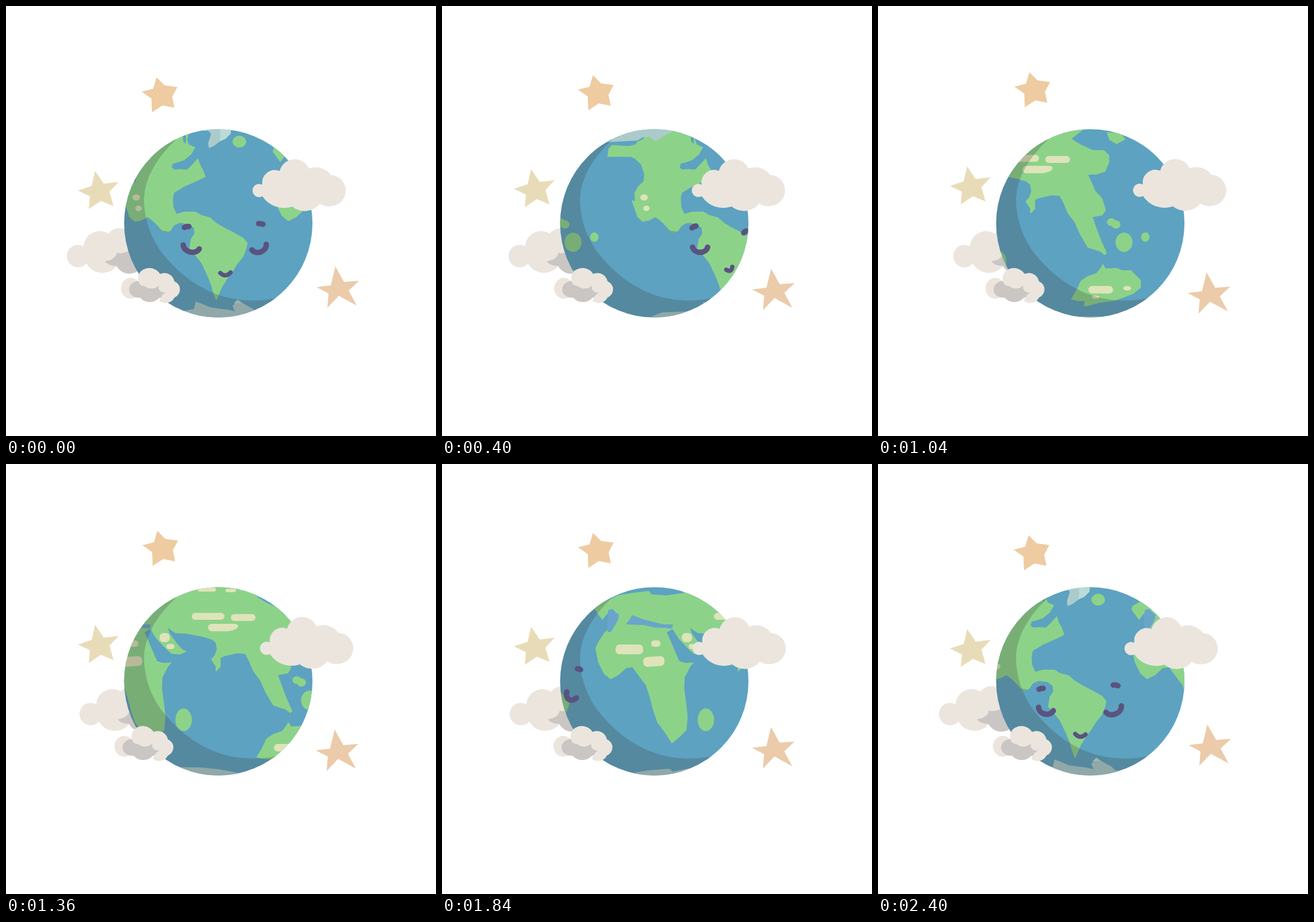
These frames come from a looping animation (748x748 px, 2480 ms). An HTML page:

```html
<!DOCTYPE html>
<html lang="en">
<head>
<meta charset="utf-8">
<title>Sleeping Earth</title>
<style>
  html, body { margin: 0; width: 100%; height: 100%; overflow: hidden; background: #fff; }
  svg { display: block; width: 100%; height: 100%; }
  .ocean { fill: #5da2c0; }
  .sea { fill: #69a5ca; }
  .land { fill: #8cd389; stroke: #8cd389; stroke-width: .6; stroke-linejoin: round; }
  .sand { fill: #dfe3b9; }
  .ice { fill: #abcbcb; }
  .snow { fill: #b9dcd8; }
  .cloud { fill: #ebe5de; }
  .dim { fill: #cac6c3; }
  #face { fill: none; stroke: #5a5380; stroke-linecap: round; }
  #face path { vector-effect: non-scaling-stroke; }
</style>
</head>
<body>
<svg viewBox="0 0 748 748">
  <defs>
    <clipPath id="disc"><circle cx="369.3" cy="378" r="163.8"/></clipPath>
    <g id="world">
      <path class="ice" d="M122 205V212L137 224 150 232 161 237 215 234 225 228 246 236 280 217V205Z"/>
      <path class="ice" d="M230 545L245 538 258 533 306 531 327 527 330 514 341 518 355 524 368 526 385 528 398 531 394 522 403 511 417 520 430 527 436 533 470 536 531 537 556 533 593 530 600 535 640 527 688 528 718 531 756 538 800 540 860 540 920 539V545Z"/>
      <g class="land">
        <!-- North America -->
        <path d="M163 262L165 248 171 242 200 244 212 241 215 236 223 233 227 229 237 228 246 236 257 229 275 219 285 208H312L317 223 315 233 318 241 329 246 322 258 310 268 298 272 290 274 288 281 293 285 303 284 315 285 325 275 334 265 337 275 343 286 347 297 335 303 310 314 292 325 290 335 291 350 297 363 293 380 286 391 278 394 270 389 260 378 252 371 246 367 235 373 224 375 215 367 210 352 205 338 211 340 210 325 217 313 226 305 227 292 221 275 210 265 203 262Z"/>
        <!-- South America -->
        <path d="M290 364L310 358 330 358 340 364 355 368 365 377 380 386 392 392 412 403 420 412 418 422 412 437 402 449 394 462 385 474 375 490 366 512 361 500 357 485 350 468 340 447 328 432 319 422 322 405 328 396 327 386 318 379 302 377 285 385Z"/>
        <ellipse cx="406" cy="236" rx="11.500" ry="10"/>
      </g>
      <path fill="#75ad7a" d="M268 390L282 392 277 395Z"/>
      <path class="ocean" d="M308 225V235L313 240V225Z"/>
      <path class="snow" d="M340 205V217L352 217 357 222 352 238 353 247 362 243 371 236 382 231 391 222 392 205Z"/>
      <path class="ice" d="M340 205V217L352 217 357 222 352 238 353 247 362 243 371 236 373 226 371 205Z"/>
      <path class="snow" d="M396 517L403 511 411 517Z"/>
      <g class="sand">
        <ellipse cx="226.5" cy="333" rx="6.5" ry="5.5"/>
        <ellipse cx="230.5" cy="352" rx="5.5" ry="4.8"/>
      </g>
      <g transform="translate(-575)">
        <g class="land">
          <!-- Africa -->
          <path d="M289 288L310 280 320 279 350 281 370 285 400 287 391 293 398 308 406 325 413 343 424 346 438 345 432 352 422 371 421 390 425 420 427 440 425 463 415 473 400 486 390 470 375 450 368 430 362 407 355 385 340 365 331 353 320 355 307 367 293 374 282 365 272 345 267 320 273 308 283 293Z"/>
          <!-- Europe and Arabia -->
          <path d="M266 253L268 247 284 238 300 232 305 229 335 224 360 221 364 227 390 229 424 224 440 205 455 290 436 288 431 283 434 294 447 312 457 323 464 326 453 331 438 330 427 320 411 303 402 288 370 284 320 280 289 290V258L279 271Z"/>
          <!-- Asia -->
          <path d="M420 225L440 205H610L608 214 586 231 602 241 624 251 643 251 652 260 652 272 645 288 630 293 615 293 622 308 628 322 640 335 646 355 640 364 623 367 630 387 638 408 648 430 644 433 637 427 615 420 602 398 592 376 580 360 573 343 566 330 552 329 530 334 523 337 523 353 515 361 515 352 507 340 513 333 517 322 515 311 508 305 491 300 465 295 445 294 436 288 420 270Z"/>
          <!-- Australia -->
          <path d="M641 449L646 457 665 456 675 460 690 460 700 470 707 477 707 490 695 500 680 506 660 513 635 516 613 522 608 522 610 513 598 513 586 510 595 495 603 478 615 470 630 465 638 455Z"/>
          <path d="M648 220L672 221 680 232 665 240 653 233Z"/>
          <ellipse cx="459" cy="445" rx="14" ry="19.5"/>
          <ellipse cx="656" cy="376" rx="7.5" ry="6.5"/>
          <ellipse cx="664" cy="380" rx="7.5" ry="7"/>
          <ellipse cx="678" cy="411" rx="14.5" ry="16.5"/>
          <ellipse cx="715" cy="402" rx="7" ry="8"/>
        </g>
        <g class="sea">
          <path d="M289 254L297 252 302 258 308 262 306 272 300 282 294 292 288 293Z"/>
          <path d="M320 279L326 271 331 263 350 270 385 279 402 279 400 286 370 284 350 280Z"/>
        </g>
        <path class="ocean" d="M391 292L402 290 411 303 420 317 429 329 439 332 438 345 424 346 413 343 405 325Z"/>
        <g class="sand">
          <rect x="302" y="314" width="48" height="17" rx="7"/>
          <rect x="364" y="307" width="16" height="11" rx="5"/>
          <rect x="350" y="335" width="37" height="17" rx="7" transform="rotate(-4 368 343)"/>
          <rect x="417" y="294" width="18" height="16" rx="7"/>
          <rect x="429" y="313" width="14" height="9" rx="4.5"/>
          <rect x="473" y="259" width="57" height="12" rx="6"/>
          <rect x="541" y="261" width="43" height="12" rx="6"/>
          <path d="M508 278H548Q556 279 553 284Q548 291 530 291H508A6.5 6.5 0 0 1 508 278Z"/>
          <rect x="484" y="215" width="31" height="7" rx="3.5"/>
          <rect x="532" y="217" width="18" height="6" rx="3"/>
          <rect x="616" y="487" width="43" height="13" rx="6.5"/>
          <ellipse cx="683.5" cy="491" rx="7" ry="4"/>
          <ellipse cx="628.5" cy="506.5" rx="6.5" ry="2.7"/>
        </g>
      </g>
    </g>
  </defs>

  <path id="starTop" fill="#eecba0" d="M262 124L276 138 298 141 289 158 293 177 272 173 254 185 253 161 236 149 256 144Z"/>
  <path id="starLeft" fill="#e8dcb8" d="M155 287L170 309 196 306 180 323 187 348 165 339 144 353 146 331 125 321 149 313Z"/>
  <path id="starRight" fill="#ebcbaa" d="M573 453L588 480 614 478 596 495 610 521 579 504 559 525 561 500 540 489 565 486Z"/>

  <g id="cloudBack">
    <path class="cloud" d="M140 448A19.5 19.5 0 1 1 135 418A28 28 0 0 1 178 396A25 25 0 0 1 220 400V450L193 452A32 32 0 0 1 140 448Z"/>
    <path class="dim" d="M172 444Q190 442 193 429Q205 433 225 420L250 440 228 462A26 26 0 0 1 192 452A24 24 0 0 1 172 444Z"/>
  </g>

  <g clip-path="url(#disc)">
    <rect class="ocean" x="200" y="208" width="340" height="340"/>
    <g id="map">
      <use href="#world" x="-773"/>
      <use href="#world"/>
      <use href="#world" x="773"/>
    </g>
    <path fill="#3c3939" fill-opacity=".245" d="M298 230Q242 283 240 335C240 375 255 410 276 435C300 464 365 530 470 508V560H200V230Z"/>
    <g id="face"></g>
  </g>

  <g id="cloudSmall">
    <ellipse class="cloud" cx="217" cy="491" rx="17" ry="18"/>
    <g class="dim">
      <ellipse cx="231" cy="493" rx="17" ry="14.5"/>
      <ellipse cx="250" cy="498" rx="20" ry="17"/>
      <ellipse cx="264" cy="495" rx="13" ry="13"/>
    </g>
    <path class="cloud" d="M231 480A17 17 0 0 1 240 458A22 22 0 0 1 268 466A18 18 0 0 1 293 479A15 15 0 0 1 293 507A17 17 0 0 1 267 513Q270 503 277 499Q263 497 266 486A18 18 0 0 1 241 487Q232 487 231 480Z"/>
  </g>
  <path id="cloudFront" class="cloud" d="M446 331A11.5 11.5 0 1 1 446 311A22 22 0 0 1 476 287A27 27 0 0 1 527 283A32 32 0 0 1 565 294A27.1 27.1 0 0 1 567 348A30 30 0 0 1 546 344A34 34 0 0 1 498 349A45 45 0 0 1 446 331Z"/>
</svg>
<script>
const STEP = 80, FRAMES = 31, PEAK = 14, RETURN = 30;
const $ = id => document.getElementById(id);

// Drift of each floating part at the turning point.
const drift = {
  starTop: [1.5, -9.5], starLeft: [0, -8.5], starRight: [-1.5, 11],
  cloudBack: [27, 0], cloudSmall: [-14, 0], cloudFront: [16, -.5]
};

const eye = ['M-15-5C-11 7 11 7 15-5', 9.5], brow = ['M-4 0Q0-1 4.5 0', 9.5], mouth = ['M-9-3Q0 6 9-3', 7.5];

// Poses: longitude in degrees, height, tilt.
const poseFrames = [23, 30, 31, 36, 40];
const features = [
  [eye, [[-100, 412, 30], [-28.4, 431, 13], [-17, 424, 14], [29.2, 424.5, 0], [90, 424, -20]]],
  [eye, [[-63, 406, 32], [15.2, 431, -23], [26.4, 424, -21], [100, 424, -40], [150, 424, -40]]],
  [brow, [[-104, 370, 0], [-31.4, 391, -12], [-19.6, 384.5, -12], [24.9, 384.5, -25], [90, 390, -35]]],
  [brow, [[-53, 357, 15], [15.6, 385, 8], [26.8, 379, 8], [74.5, 393, -35], [130, 393, -35]]],
  [mouth, [[-85, 450, 25], [-6, 473, 3], [4.5, 467, -3], [53.6, 459, -25], [110, 450, -35]]]
].map(([[d, width], poses]) => {
  const path = document.createElementNS('http://www.w3.org/2000/svg', 'path');
  path.setAttribute('d', d);
  path.setAttribute('stroke-width', width);
  $('face').append(path);
  return { path, poses };
});

const move = (el, x, y) => el.setAttribute('transform', `translate(${x} ${y})`);

function drawFace(frame) {
  const n = frame < 15 ? frame + FRAMES : frame;
  const i = Math.max(0, poseFrames.slice(1, -1).filter(f => f <= n).length);
  const k = (n - poseFrames[i]) / (poseFrames[i + 1] - poseFrames[i]);
  for (const { path, poses } of features) {
    const [lon, y, tilt] = poses[i].map((v, j) => v + (poses[i + 1][j] - v) * k);
    const angle = lon * Math.PI / 180;
    const x = 369 + 164 * Math.sin(angle), squash = Math.max(.65, Math.cos(angle));
    path.style.display = Math.abs(lon) < 88 ? '' : 'none';
    path.setAttribute('transform', `translate(${x} ${y}) rotate(${tilt}) scale(${squash} 1)`);
  }
}

function draw(now) {
  const frame = Math.floor(now / STEP) % FRAMES;
  const u = frame < PEAK ? frame / PEAK : (RETURN - frame) / (RETURN - PEAK);
  for (const id in drift) move($(id), drift[id][0] * u, drift[id][1] * u);
  move($('map'), frame * 25, 0);
  drawFace(frame);
  requestAnimationFrame(() => draw(performance.now() - start));
}

const start = performance.now();
draw(0);
</script>
</body>
</html>
```
